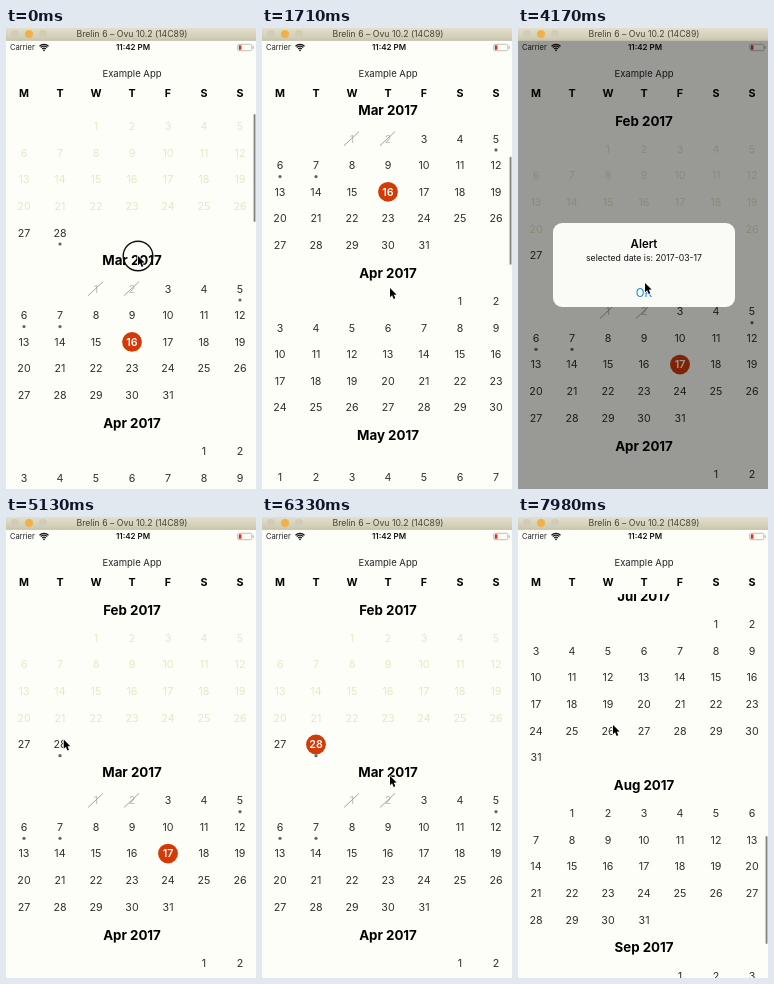
Recreate the animation shown at these times as an HTML page with a canvas. Size 250 by 461 pixels, loop 8000 ms.

```html
<!DOCTYPE html>
<html lang="en">
<head>
<meta charset="utf-8">
<title>Calendar list</title>
<style>
html, body { margin: 0; width: 100%; height: 100%; overflow: hidden; background: #fefef9; }
canvas { display: block; width: 250px; height: 461px; }
</style>
</head>
<body>
<canvas id="stage"></canvas>
<script>
const W = 250, H = 461, LOOP = 8000;
const PAPER = '#fefef9', INK = '#30302c', RED = '#d23a08';
const COL = 36, ROW = 26.6, GAP = 28, LIST_TOP = 77;
const FONT = 'Inter, Roboto, sans-serif';
const NAMES = ['Jan', 'Feb', 'Mar', 'Apr', 'May', 'Jun', 'Jul', 'Aug', 'Sep', 'Oct', 'Nov', 'Dec'];

const canvas = document.getElementById('stage');
const ctx = canvas.getContext('2d');
const ratio = window.devicePixelRatio || 1;
canvas.width = W * ratio;
canvas.height = H * ratio;

const clamp = v => Math.max(0, Math.min(1, v));
const EASE = {
  lin: p => p,
  io: p => p * p * (3 - 2 * p),
  out: p => 1 - (1 - p) ** 3
};

// Keys are [time, ease into the key, ...values].
function track(keys, t) {
  let i = 1;
  while (i < keys.length - 1 && t > keys[i][0]) i++;
  const a = keys[i - 1], b = keys[i];
  const p = EASE[b[1]](clamp((t - a[0]) / (b[0] - a[0])));
  return a.slice(2).map((v, n) => v + (b[n + 2] - v) * p);
}

const SCROLL = [
  [0, 'lin', 22.7], [200, 'lin', 102], [750, 'out', 180], [900, 'lin', 180],
  [1050, 'lin', 232.5], [1130, 'lin', 262], [1450, 'out', 300], [1560, 'lin', 300],
  [1700, 'lin', 190], [2020, 'out', 0], [7330, 'lin', 0], [7460, 'lin', 120],
  [7980, 'out', 839], [8000, 'lin', 839]
];
const POINTER = [
  [0, 'lin', 132, 228], [200, 'lin', 130, 149], [750, 'io', 128, 206], [900, 'lin', 128, 206],
  [1050, 'lin', 129, 154], [1130, 'lin', 129, 125], [1450, 'io', 125, 150], [1560, 'lin', 125, 150],
  [1700, 'lin', 128, 260], [2500, 'io', 130, 322], [2940, 'io', 132, 331], [3260, 'io', 163, 337],
  [3480, 'lin', 163, 337], [3950, 'io', 127, 255], [4500, 'lin', 127, 255], [5050, 'io', 58, 222],
  [5620, 'lin', 56, 226], [5800, 'lin', 56, 226], [6100, 'io', 128, 259], [6500, 'lin', 128, 259],
  [7100, 'io', 100, 328], [7330, 'lin', 100, 328], [7460, 'lin', 95, 208], [8000, 'lin', 95, 208]
];
const PRESSES = [[0, 200], [900, 1130], [1560, 1700], [3330, 3430], [4290, 4390],
  [5650, 5740], [6140, 6220], [7330, 7460]];
const ALERTS = [[3450, 4420, '2017-03-17'], [5760, 6240, '2017-02-28']];

function layOutMonths() {
  const months = [];
  let y = 93;
  for (let m = 1; m < 10; m++) {
    const first = (new Date(2017, m, 1).getDay() + 6) % 7;
    const days = new Date(2017, m + 1, 0).getDate();
    const lead = m === 4 ? ROW / 2 : 0;
    months.push({ m, first, days, y, lead });
    y += 2 * GAP + lead + (Math.ceil((first + days) / 7) - 1) * ROW;
  }
  return months;
}
const MONTHS = layOutMonths();

function text(s, x, y, size, color = INK, weight = 400, align = 'center') {
  ctx.font = `${weight} ${size}px ${FONT}`;
  ctx.textAlign = align;
  ctx.fillStyle = color;
  ctx.fillText(s, x, y + size * 0.36);
}

function disc(x, y, r, color) {
  ctx.fillStyle = color;
  ctx.beginPath();
  ctx.arc(x, y, r, 0, 7);
  ctx.fill();
}

function box(x, y, w, h, r, color) {
  ctx.fillStyle = color;
  ctx.beginPath();
  ctx.roundRect(x, y, w, h, r);
  ctx.fill();
}

function line(x1, y1, x2, y2, color, width) {
  ctx.strokeStyle = color;
  ctx.lineWidth = width;
  ctx.beginPath();
  ctx.moveTo(x1, y1);
  ctx.lineTo(x2, y2);
  ctx.stroke();
}

function drawDay(m, d, x, y, picked) {
  const past = m === 1 && d < 27;
  const struck = m === 2 && d < 3;
  const dotted = m === 1 && d === 28 || m === 2 && d >= 5 && d <= 7;
  if (picked) disc(x, y, 9.9, RED);
  const color = picked ? '#fff' : past ? '#e3e8c6' : struck ? '#bcbcb0' : INK;
  text(d, x, y, 10.7, color, picked ? 600 : 400);
  if (struck) line(x - 8, y + 7, x + 7, y - 7, '#a5a59c', 1);
  if (dotted) disc(x, y + 11.3, 1.6, '#66665e');
}

function drawList(scroll, picked) {
  ctx.save();
  ctx.beginPath();
  ctx.rect(0, LIST_TOP, W, H - LIST_TOP);
  ctx.clip();
  for (const { m, first, days, y, lead } of MONTHS) {
    const head = y - scroll;
    if (head > H + 10 || head < -200) continue;
    text(NAMES[m] + ' 2017', 126, head, 13.3, '#000', 700);
    for (let d = 1; d <= days; d++) {
      const cell = first + d - 1;
      drawDay(m, d, 18 + cell % 7 * COL, head + GAP + lead + Math.floor(cell / 7) * ROW,
        picked === m * 100 + d);
    }
  }
  ctx.restore();
}

function drawScrollbar(t, scroll) {
  const alpha = t < 2400 ? 1 - clamp((t - 2120) / 260) : clamp((t - 7330) / 60);
  if (!alpha) return;
  ctx.globalAlpha = alpha;
  box(247.6, 79.5 + scroll * 0.2855, 1.9, 108, 1, '#85857f');
  ctx.globalAlpha = 1;
}

function drawHeader() {
  text('Carrier', 4, 19.5, 7.6, '#222', 400, 'left');
  ctx.strokeStyle = '#111';
  ctx.lineWidth = 1.2;
  for (const r of [2.6, 4.6, 6.4]) {
    ctx.beginPath();
    ctx.arc(38, 22.8, r, -Math.PI * 0.75, -Math.PI * 0.25);
    ctx.stroke();
  }
  disc(38, 22.3, 0.9, '#111');
  text('11:42 PM', 127, 19.5, 8, '#111', 600);
  ctx.strokeStyle = '#a9a39b';
  ctx.lineWidth = 0.7;
  ctx.beginPath();
  ctx.roundRect(231.8, 16.3, 14, 6.4, 1.3);
  ctx.stroke();
  box(232.8, 17.3, 2.6, 4.4, 0.5, '#e03020');
  box(246.6, 18.3, 1, 2.4, 0.5, '#a9a39b');
  text('Example App', 126, 45.3, 9.5, '#222');
  [...'MTWTFSS'].forEach((c, i) => text(c, 18 + i * COL, 65, 10.7, '#000', 700));
}

function drawTitleBar() {
  const g = ctx.createLinearGradient(0, 0, 0, 12);
  g.addColorStop(0, '#e2dfcd');
  g.addColorStop(1, '#cdc9b0');
  ctx.fillStyle = g;
  ctx.fillRect(0, 0, W, 12.5);
  line(0, 12.3, W, 12.3, '#b0ac98', 0.6);
  disc(9, 6, 4, '#d0ccb9');
  disc(23, 6, 4, '#f3b04a');
  disc(37, 6, 4, '#d0ccb9');
  text('Brelin 6 – Ovu 10.2 (14C89)', 126, 6.2, 8.7, '#45433c');
}

function drawAlert(t) {
  for (const [from, to, date] of ALERTS) {
    const shown = EASE.out(clamp((t - from) / 220));
    const alpha = shown * (1 - EASE.io(clamp((t - to) / 90)));
    if (!alpha) continue;
    ctx.save();
    ctx.globalAlpha = alpha;
    ctx.fillStyle = 'rgba(0, 0, 0, 0.4)';
    ctx.fillRect(0, 12.5, W, H);
    const scale = 1.15 - 0.15 * shown;
    ctx.translate(126, 237);
    ctx.scale(scale, scale);
    ctx.translate(-126, -237);
    box(35, 195, 182, 84, 9, '#fafaf7');
    text('Alert', 126, 215.5, 11.4, '#000', 600);
    text('selected date is: ' + date, 126, 230.3, 8.7, '#111');
    text('OK', 126, 264.5, 11.4, '#1682e0');
    ctx.restore();
  }
}

function drawPointer(t) {
  const [x, y] = track(POINTER, t);
  if (PRESSES.some(([a, b]) => t >= a && t < b)) {
    ctx.strokeStyle = '#111';
    ctx.lineWidth = 1.4;
    ctx.beginPath();
    ctx.arc(x, y, 14.8, 0, 7);
    ctx.stroke();
  }
  ctx.save();
  ctx.translate(x, y);
  ctx.beginPath();
  ctx.moveTo(0, 0);
  for (const [px, py] of [[0, 9.2], [2.1, 7.3], [3.7, 11], [5.3, 10.3], [3.8, 6.8], [6.6, 6.6]]) {
    ctx.lineTo(px, py);
  }
  ctx.closePath();
  ctx.lineJoin = 'round';
  ctx.strokeStyle = '#fff';
  ctx.lineWidth = 1.5;
  ctx.stroke();
  ctx.fillStyle = '#000';
  ctx.fill();
  ctx.restore();
}

function draw(t) {
  const [scroll] = track(SCROLL, t);
  const picked = t < 3430 ? 216 : t < 5740 ? 217 : 128;
  ctx.setTransform(ratio, 0, 0, ratio, 0, 0);
  ctx.fillStyle = PAPER;
  ctx.fillRect(0, 0, W, H);
  drawList(scroll, picked);
  drawScrollbar(t, scroll);
  drawHeader();
  drawAlert(t);
  drawTitleBar();
  drawPointer(t);
}

let begin;
function tick(now) {
  begin ??= now;
  draw((now - begin) % LOOP);
  requestAnimationFrame(tick);
}
draw(0);
requestAnimationFrame(tick);
</script>
</body>
</html>
```
